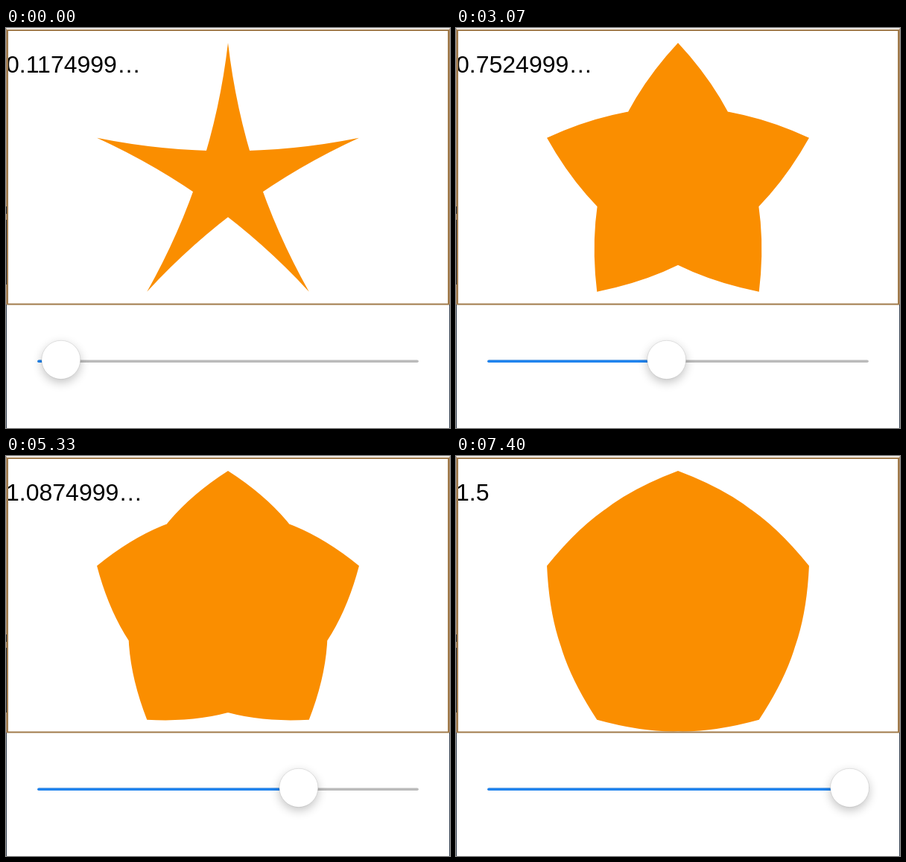
An HTML page with a canvas for the animation above (7470 ms loop, 596 by 538 pixels).

```html
<!DOCTYPE html>
<html lang="en">
<head>
<meta charset="utf-8">
<title>Star shape slider</title>
<style>
  html, body { margin: 0; width: 100%; height: 100%; overflow: hidden; background: #fff; }
  canvas { display: block; }
</style>
</head>
<body>
<canvas id="stage" width="596" height="538"></canvas>
<script>
const ctx = document.getElementById('stage').getContext('2d');
const LOOP = 7470, TAU = Math.PI * 2;
const ORANGE = '#fa8e00', BROWN = '#a07a4a', BLUE = '#1f83ee', GRAY = '#bbbbbb';

// Drag of the slider: [step, value], 15 steps per second
const keys = [[0, .1175], [17, .25], [29, .475], [46, .7525], [70, 1], [90, 1.1875], [111, 1.5]];

function tangent(i) {
  const a = keys[Math.max(i - 1, 0)], b = keys[Math.min(i + 1, keys.length - 1)];
  return (b[1] - a[1]) / (b[0] - a[0]);
}

// Cubic Hermite curve through the keys, snapped to the slider's resolution
function valueAt(step) {
  let i = 0;
  while (i < keys.length - 2 && step >= keys[i + 1][0]) i++;
  const [s0, v0] = keys[i], [s1, v1] = keys[i + 1];
  const d = s1 - s0, u = Math.min((step - s0) / d, 1), w = 1 - u;
  const v = v0 * w * w * (1 + 2 * u) + v1 * u * u * (3 - 2 * u)
    + d * u * w * (w * tangent(i) - u * tangent(i + 1));
  return Math.round(v * 400) / 400;
}

function rect(color, x, y, w, h) {
  ctx.fillStyle = color;
  ctx.fillRect(x, y, w, h);
}

function polar(tip, radius) {
  const a = tip * TAU / 5;
  return [298 + radius * Math.sin(a), 205 - radius * Math.cos(a)];
}

// Pentagram whose strokes bend towards the tip they skip
function drawStar(bend) {
  const R = 185;
  ctx.beginPath();
  ctx.moveTo(...polar(0, R));
  for (let tip = 0; tip < 10; tip += 2) {
    ctx.quadraticCurveTo(...polar(tip + 1, R * bend), ...polar(tip + 2, R));
  }
  ctx.fillStyle = ORANGE;
  ctx.fill();
}

function drawLabel(value) {
  const text = String(Math.fround(value));
  ctx.fillStyle = '#000';
  ctx.font = '32px "Liberation Sans", Helvetica, Arial, sans-serif';
  ctx.fillText(text.length > 10 ? text.slice(0, 9) + '…' : text, 0, 60);
}

function drawFrame() {
  rect('#e4dcd4', 0, 0, 596, 1);
  for (const x of [0, 595]) {
    rect('#a98c70', x, 1, 1, 371);
    rect('#3a4656', x, 372, 1, 166);
  }
  rect('#1c222c', 0, 240, 1, 10);
  rect('#1c222c', 0, 258, 1, 87);
  ctx.strokeStyle = BROWN;
  ctx.lineWidth = 2;
  ctx.strokeRect(2, 3, 592, 368.5);
}

function track(color, from, to) {
  ctx.strokeStyle = color;
  ctx.lineWidth = 3.6;
  ctx.lineCap = 'round';
  ctx.beginPath();
  ctx.moveTo(from, 448.3);
  ctx.lineTo(to, 448.3);
  ctx.stroke();
}

function drawSlider(value) {
  const x = 68.1 + (value - .1) * 328.9;
  track(GRAY, 44, 552);
  track(BLUE, 44, Math.max(x - 20, 44));
  ctx.beginPath();
  ctx.arc(x, 446.3, 26, 0, TAU);
  ctx.save();
  ctx.shadowColor = 'rgba(0,0,0,.24)';
  ctx.shadowBlur = 13;
  ctx.shadowOffsetY = 4.5;
  ctx.fillStyle = '#fff';
  ctx.fill();
  ctx.restore();
  ctx.strokeStyle = 'rgba(0,0,0,.1)';
  ctx.lineWidth = 1;
  ctx.stroke();
}

function draw(now) {
  const step = Math.floor((now % LOOP + 4) * 3 / 200);
  const value = valueAt(step);
  rect('#fff', 0, 0, 596, 538);
  drawStar(value);
  drawLabel(value);
  drawFrame();
  drawSlider(value);
}

const start = performance.now();
function tick() {
  draw(performance.now() - start);
  requestAnimationFrame(tick);
}
tick();
</script>
</body>
</html>
```
